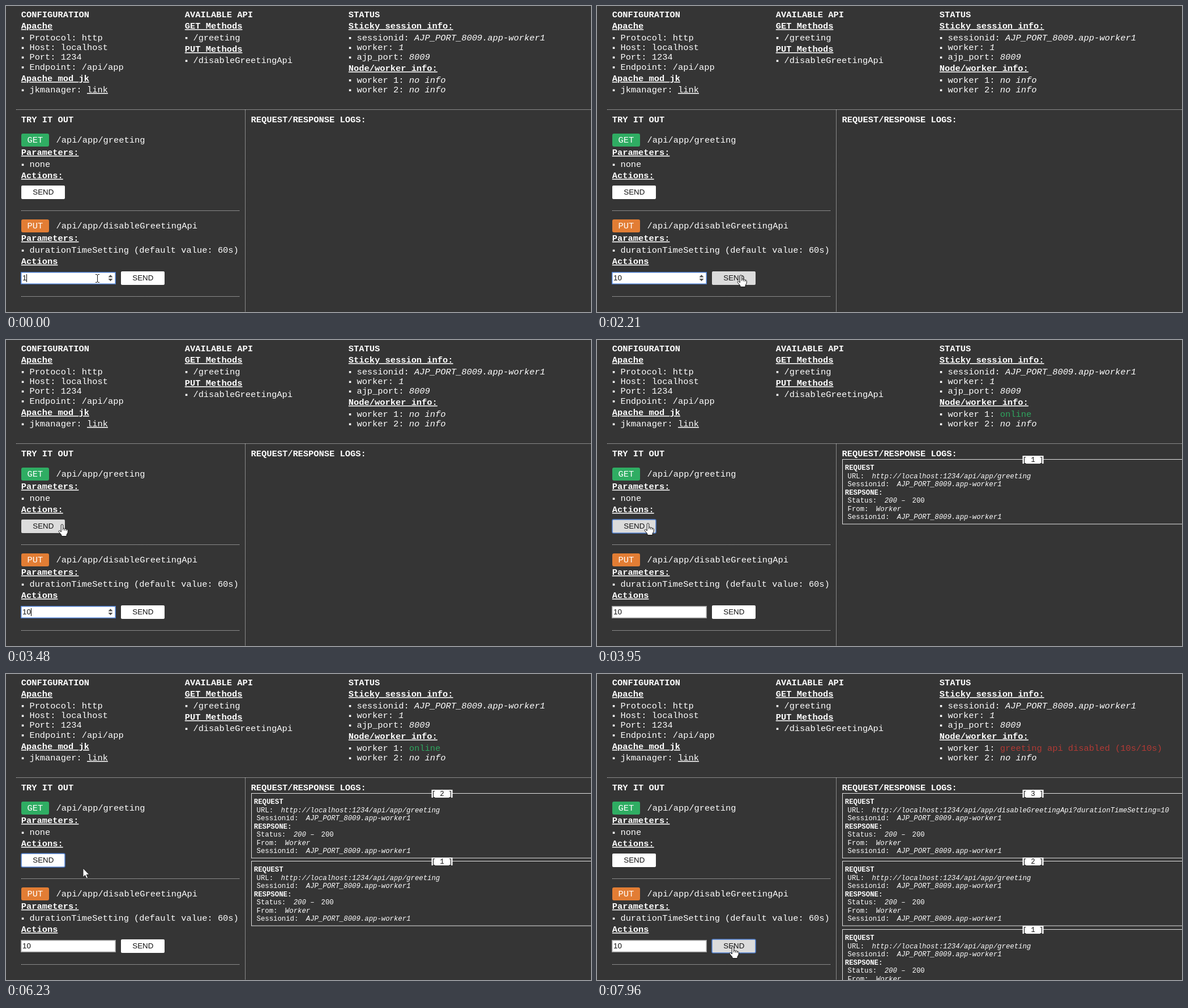
These frames come from a looping animation (1033x542 px, 8000 ms). An HTML page:

```html
<!DOCTYPE html>
<html lang="en">
<head>
<meta charset="utf-8">
<title>API tester</title>
<style>
  html, body { margin: 0; width: 100%; height: 100%; overflow: hidden; background: #353535; }
  svg { display: block; width: 1033px; height: 542px; }
  text { font: 15.4px "Liberation Mono", monospace; fill: #fff; white-space: pre; }
  .bold { font-weight: bold; }
  .italic { font-style: italic; }
  .under { text-decoration: underline; }
  .small { font-size: 12.32px; }
  .ui { font: 13.33px "Liberation Sans", Arial, sans-serif; fill: #111; }
  .dark { fill: #111; }
  .online { fill: #2fa65f; }
  .disabled { fill: #b33a35; }
  .dots { stroke: #ddd; stroke-dasharray: 1 1; fill: none; }
</style>
</head>
<body>
<svg viewBox="0 0 1033 542"><g id="page"></g><g id="live"></g></svg>
<script>
const LOOP = 8000;
const CHAR = 9.24, SMALL_CHAR = 7.392;
const BLUE = '#4f7fce';
const INPUT = { x: 26, y: 471, w: 168, h: 22 };
const GET_SEND = { x: 27, y: 318, w: 77, h: 24 };
const PUT_SEND = { x: 203, y: 470, w: 77, h: 24 };
const GREETING = 'greeting', DISABLE = 'disableGreetingApi?durationTimeSetting=10';

// Pointer hotspot: time, x, y; easing applies to the stretch ending at the key.
const linear = u => u, easeIn = u => u * u, easeOut = u => u * (2 - u);
const smooth = u => u * u * (3 - 2 * u);
const POINTER = [
  [0, 161, 482], [690, 161, 482], [860, 160, 487, linear],
  [990, 160, 487], [1500, 253, 470, smooth], [1560, 262, 471, linear],
  [1690, 262, 471], [1960, 254, 476, smooth],
  [2200, 254, 476], [2560, 250, 471, smooth],
  [2690, 250, 471], [2920, 246, 463, easeIn], [3540, 95, 322, smooth],
  [3600, 95, 322], [3710, 90, 324, linear],
  [5820, 90, 324], [6230, 136, 344, easeIn], [6590, 220, 431, easeOut],
  [6900, 236, 487, easeOut], [7220, 240, 482, smooth], [LOOP, 240, 482]
];

const text = (x, y, s, cls = '') => `<text x="${x}" y="${y}" class="${cls}">${s}</text>`;
const rect = (x, y, w, h, fill, extra = '') =>
  `<rect x="${x}" y="${y}" width="${w}" height="${h}" fill="${fill}" ${extra}/>`;
const path = (d, extra) => `<path d="${d}" ${extra}/>`;
const inside = (p, b) => p.x >= b.x && p.x <= b.x + b.w && p.y >= b.y && p.y <= b.y + b.h;

const title = (x, y, s) => text(x, y, s, 'bold');
const heading = (x, y, s) => text(x, y, s, 'bold under');
const item = (x, y, label, value = '', cls = 'italic') =>
  rect(x + 1, y - 5.5, 3.5, 3.5, '#fff') + text(x + 14.6, y, label) +
  text(x + 14.6 + (label.length + 1) * CHAR, y, value, cls);
const badge = (y, method, color, url) =>
  rect(27, y, 49, 23, color, 'rx="3"') + text(37.5, y + 15.7, method) + text(88.5, y + 15.7, url);

function drawPage() {
  const a = 26.8, b = 315.8, c = 604.8;
  return [
    title(a, 20, 'CONFIGURATION'), heading(a, 40, 'Apache'),
    item(a, 60.5, 'Protocol: http'), item(a, 78, 'Host: localhost'),
    item(a, 95, 'Port: 1234'), item(a, 112.5, 'Endpoint: /api/app'),
    heading(a, 133, 'Apache mod_jk'), item(a, 153, 'jkmanager:', 'link', 'under'),

    title(b, 20, 'AVAILABLE API'), heading(b, 40, 'GET Methods'), item(b, 60.5, '/greeting'),
    heading(b, 81, 'PUT Methods'), item(b, 101, '/disableGreetingApi'),

    title(c, 20, 'STATUS'), heading(c, 40, 'Sticky session info:'),
    item(c, 60.5, 'sessionid:', 'AJP_PORT_8009.app-worker1'),
    item(c, 78, 'worker:', '1'), item(c, 95, 'ajp_port:', '8009'),
    heading(c, 115, 'Node/worker info:'), item(c, 153, 'worker 2:', 'no info'),

    path('M18 183.5H1033M422.5 184V542M27 362.5H412M27 514.5H412', 'class="dots"'),
    title(a, 206, 'TRY IT OUT'), title(432.5, 206, 'REQUEST/RESPONSE LOGS:'),

    badge(226, 'GET', '#2fad63', '/api/app/greeting'),
    heading(a, 264, 'Parameters:'), item(a, 285, 'none'), heading(a, 305, 'Actions:'),

    badge(378, 'PUT', '#e27d34', '/api/app/disableGreetingApi'),
    heading(a, 416, 'Parameters:'),
    item(a, 437, 'durationTimeSetting (default value: 60s)'), heading(a, 457, 'Actions')
  ].join('');
}

function drawButton(b, hover, focus) {
  const outline = focus ? `stroke="${BLUE}" stroke-width="1.5"` : '';
  return rect(b.x, b.y, b.w, b.h, hover ? '#dcdcdc' : '#fff', `rx="2" ${outline}`) +
    text(b.x + 20.3, b.y + 16, 'SEND', 'ui');
}

function drawInput(value, focus, caret) {
  const { x, y, w, h } = INPUT;
  let out = rect(x + .75, y + .75, w - 1.5, h - 1.5, '#fff',
    `stroke="${focus ? BLUE : '#a0a0a0'}" stroke-width="1.5"`) + text(29, 486, value, 'ui');
  if (focus) out += path('M180.5 480.5l4 -4.5 4 4.5zM180.5 483l4 4.5 4 -4.5z', 'fill="#505050"');
  if (caret) out += rect(29 + Math.round(value.length * 7.4), 475, 1, 14, '#000');
  return out;
}

function drawLog(number, call, y) {
  const line = (row, label, value) =>
    text(442.5, y + 33.5 + row * 14.5, label, 'small') +
    text(442.5 + label.length * SMALL_CHAR + 13.4, y + 33.5 + row * 14.5, value, 'small italic');
  const session = 'AJP_PORT_8009.app-worker1';
  return rect(433.5, y + .5, 640, 114.5, 'none', 'stroke="#e4e4e4"') +
    rect(751.5, y - 6, 37, 14, '#fff') + text(751.5, y + 5, `[ ${number} ]`, 'small dark') +
    text(437.8, y + 19, 'REQUEST', 'small bold') +
    line(0, 'URL:', 'http://localhost:1234/api/app/' + call) +
    line(1, 'Sessionid:', session) +
    text(437.8, y + 62.5, 'RESPSONE:', 'small bold') +
    line(3, 'Status:', '200') + text(537.3, y + 77, '–', 'small') + text(556.6, y + 77, '200', 'small') +
    line(4, 'From:', 'Worker') + line(5, 'Sessionid:', session);
}

function pointerAt(t) {
  const i = Math.max(1, POINTER.findIndex(k => k[0] > t));
  const [t0, x0, y0] = POINTER[i - 1], [t1, x1, y1, ease = linear] = POINTER[i];
  const u = ease((t - t0) / (t1 - t0));
  return { x: Math.round(x0 + (x1 - x0) * u), y: Math.round(y0 + (y1 - y0) * u) };
}

function drawPointer(p, shape) {
  const shapes = {
    beam: path('M-3 -6.5H-1L.5 -5.5L2 -6.5H4M.5 -5.5V6.5M-3 7.5H-1L.5 6.5L2 7.5H4',
      'fill="none" stroke="#111"'),
    hand: path('M-1.7 1.5Q0 -.5 1.7 1.5V8Q3.4 6.6 4.6 8.4Q6.3 7.4 7.4 9.3Q9.4 8.6 10.2 11V15L8 19V21.5H-1V19.5' +
      'L-5.8 13.5Q-5.8 10.6 -3.4 12L-1.7 14Z', 'fill="#fff" stroke="#111" stroke-linejoin="round"') +
      path('M1.7 8V11M4.6 8.8V11.5M7.4 9.5V12', 'stroke="#111" fill="none"'),
    arrow: path('M0 0V15.8L3.6 12.4L6 18L8.6 17L6.2 11.4H11Z', 'fill="#fff" stroke="#222"')
  };
  return `<g transform="translate(${p.x} ${p.y})">${shapes[shape]}</g>`;
}

function workerStatus(t) {
  if (t < 3950) return ['no info', 'italic'];
  return t < 7960 ? ['online', 'online'] : ['greeting api disabled (10s/10s)', 'disabled'];
}

function drawLive(t) {
  const pointer = pointerAt(t);
  const overGet = inside(pointer, GET_SEND), overPut = inside(pointer, PUT_SEND);
  const shape = overGet || overPut ? 'hand' : inside(pointer, INPUT) ? 'beam' : 'arrow';
  const typing = t < 3890;
  const caret = typing && (t < 250 || Math.floor((t - 240) / 500) % 2 === 0) && !(t >= 3710);
  const calls = [[3950, GREETING], [5820, GREETING], [7960, DISABLE]].filter(c => t >= c[0]);

  return item(604.8, 135.5, 'worker 1:', ...workerStatus(t)) +
    drawButton(GET_SEND, overGet, t >= 3890 && t < 7840) +
    drawButton(PUT_SEND, overPut, t >= 7840) +
    drawInput(t < 250 ? '1' : '10', typing, caret) +
    calls.map((c, i) => drawLog(i + 1, c[1], 211 + Math.round((calls.length - 1 - i) * 120.4))).join('') +
    drawPointer(pointer, shape);
}

const live = document.getElementById('live');
document.getElementById('page').innerHTML = drawPage();
const start = performance.now();
let shown = '';

function frame() {
  const markup = drawLive((performance.now() - start) % LOOP);
  if (markup !== shown) live.innerHTML = shown = markup;
  requestAnimationFrame(frame);
}
frame();
</script>
</body>
</html>
```
